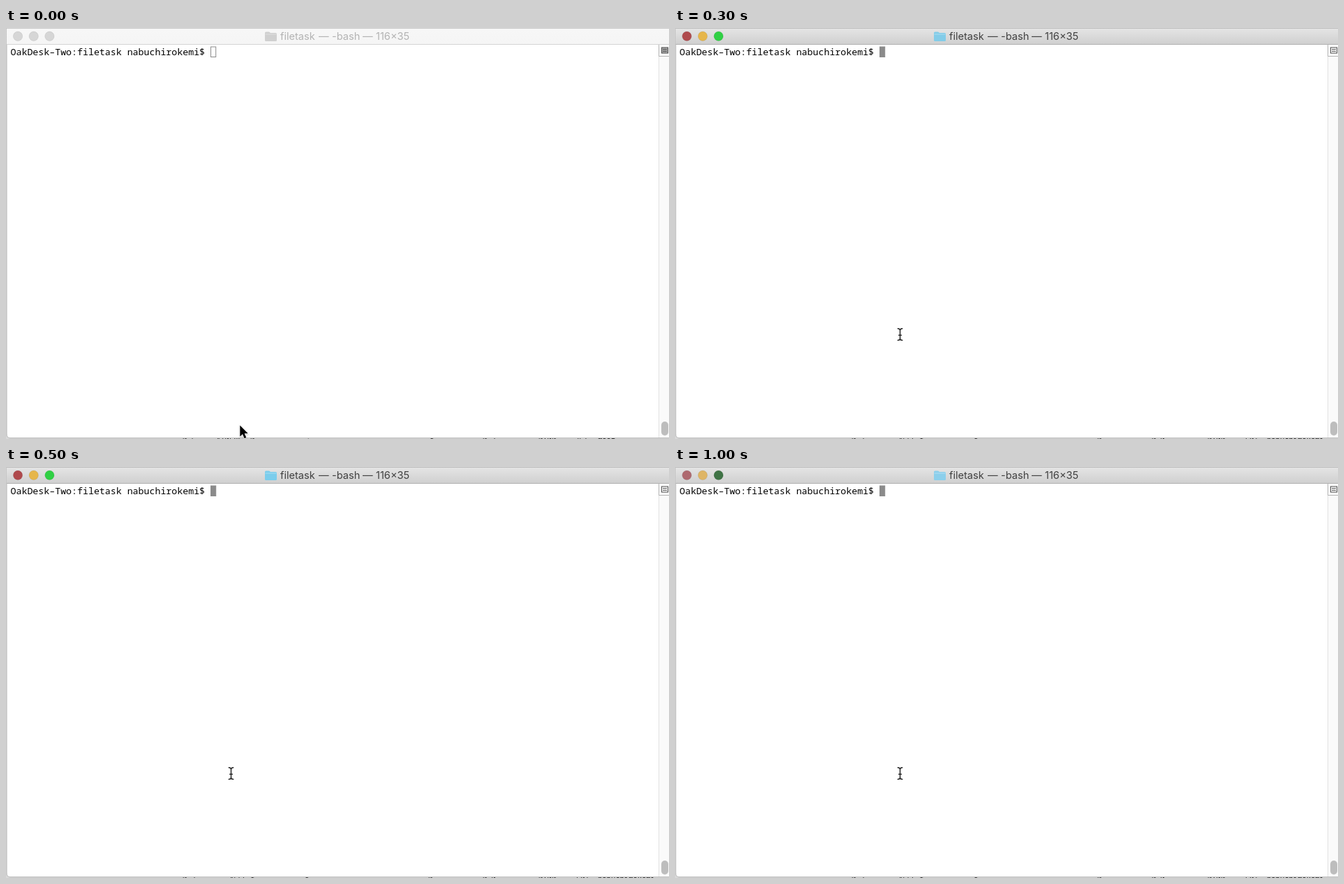
An HTML page for the animation above (1.2 s loop, 950x589 px).

```html
<!DOCTYPE html>
<html lang="en">
<head>
<meta charset="utf-8">
<title>Terminal</title>
<style>
  html, body { margin: 0; width: 100%; height: 100%; overflow: hidden; background: #fff; }
  svg { display: block; width: 950px; height: 589px; }
  text { white-space: pre; }
  .mono { font-family: "Noto Sans Mono", "DejaVu Sans Mono", monospace; }
  .title { font: 14.6px Inter, "Liberation Sans", sans-serif; fill: var(--label); }
  .prompt { font-size: 13.27px; font-weight: 500; fill: #000; }
  .behind { font-size: 10.5px; fill: #222; }
  #bar { fill: url(#idle); }
  .active #bar { fill: url(#focus); }
  #stage { --label: #b3b3b3; --rule: #d4d4d4; --top: #c9c9c9; }
  #stage.active { --label: #414141; --rule: #b1b1b1; --top: #bdbdbd; }
</style>
</head>
<body>
<svg id="stage" viewBox="0 0 950 589">
  <defs>
    <linearGradient id="idle" x2="0" y2="1">
      <stop stop-color="#f7f7f7"/><stop offset="1" stop-color="#f5f5f5"/>
    </linearGradient>
    <linearGradient id="focus" x2="0" y2="1">
      <stop stop-color="#e5e5e5"/><stop offset="1" stop-color="#cfcfcf"/>
    </linearGradient>
    <filter id="soft" x="-50%" y="-50%" width="200%" height="200%">
      <feDropShadow dx="0" dy="1" stdDeviation="1.1" flood-opacity=".35"/>
    </filter>
  </defs>

  <!-- Windows behind -->
  <rect width="950" height="589" fill="#d8d8d8"/>
  <g id="behind" class="mono behind"></g>

  <!-- Window -->
  <path d="M1 0H950V587.5H6Q1 587.5 1 582Z" fill="#fff" stroke="#b4b4b4"/>
  <rect id="bar" x="1" width="949" height="24"/>
  <path d="M1 .5H950" stroke="var(--top)"/>
  <path d="M1 23.5H950" stroke="var(--rule)"/>
  <g id="lights"></g>
  <g id="folder">
    <path d="M371 7Q371 5.5 372.5 5.5H377L379 7H386.5Q388 7 388 8.5V17.5Q388 19 386.5 19H372.5Q371 19 371 17.5Z"/>
    <path d="M371.5 9H387.5" stroke="#fff" stroke-opacity=".35"/>
  </g>
  <g id="title" class="title"></g>

  <!-- Scroll bar -->
  <path d="M936 24H950V587H936Z" fill="#fafafa"/>
  <path d="M935.5 24V587" stroke="#e3e3e3"/>
  <path d="M950 40.5H935.5V24" fill="none" stroke="#b4b4b4"/>
  <rect id="split" x="939.5" y="28" width="9" height="8" stroke="#4a4a4a"/>
  <path d="M941 30.7H947M941 33.3H947" stroke="#4a4a4a"/>
  <rect x="939" y="564" width="10" height="20" rx="5" fill="#bdbdbd"/>

  <text id="prompt" class="mono prompt" x="6.5" y="39"></text>
  <rect id="caret" x="293.5" y="27" width="7.2" height="14.5" stroke="#8b8b8b"/>

  <!-- Pointers -->
  <path id="arrow" d="M0 0V16L3.7 12.6L6.2 18.6L9 17.4L6.4 11.5H11.4Z"
        stroke="#fff" stroke-width="1.2" paint-order="stroke" filter="url(#soft)"/>
  <g id="beam" fill="none" stroke-linecap="round">
    <path d="M319.3 430.8Q322.5 431 322.5 433.5V445Q322.5 447.4 319.3 447.6M325.7 430.8Q322.5 431 322.5 433.5M322.5 445Q322.5 447.4 325.7 447.6M320.7 440.3H324.3"
          stroke="#262626" stroke-width="1.5"/>
  </g>
</svg>
<script>
const LOOP = 1200;
const FOLDER = "filetask", USER = "nabuchirokemi";
const $ = id => document.getElementById(id);

function add(parent, tag, attrs, text = "") {
  const el = document.createElementNS("http://www.w3.org/2000/svg", tag);
  for (const key in attrs) el.setAttribute(key, attrs[key]);
  el.textContent = text;
  return parent.appendChild(el);
}

const idle = ["#d6d6d6", "#d6d6d6", "#d6d6d6"];
const lit = ["#af4a4d", "#e6b64b", "#30d044"];
const dim = ["#ae696f", "#deb565", "#3f7345"];

const steps = [
  { at: 0, arrow: [335.3, 569.5], lights: idle, folder: "#d0d0d0", rows: 0 },
  { at: 100, arrow: [322.3, 437.5], lights: idle, folder: "#d0d0d0", rows: 1 },
  { at: 200, active: true, lights: lit, folder: "#83cce8", rows: 1 },
  { at: 300, active: true, block: true, lights: lit, folder: "#83cce8", rows: 1 },
  { at: 500, active: true, block: true, lights: lit, folder: "#7bcdec", rows: 1 },
  { at: 700, active: true, block: true, lights: dim, folder: "#8ccfeb", rows: 1 }
];

// Listing rows of which only a sliver shows below the window
const rows = [
  [[253, "0.5"], [301, "410586"], [350, "0"], [430, "'"], [607, "*"],
   [683, "0.7"], [763, "0:00"], [815, "251"], [848, "root"]],
  [[253, "0.7"], [320, "4556"], [350, "*"], [428, "*"], [605, "0"],
   [683, "0.0"], [763, "0:00"], [817, "501"], [848, USER]]
].map(row => {
  const g = add($("behind"), "g", {});
  for (const [x, text] of row) add(g, "text", { x, y: 594 }, text);
  return g;
});

const lights = [17, 39.7, 62.4].map(cx => add($("lights"), "circle",
  { cx, cy: 11.8, r: 6.7, stroke: "#000", "stroke-opacity": .07 }));

const title = [[393, FOLDER], [448, "—"], [467, "-bash"], [511, "—"], [530, "116×35"]];
for (const [x, text] of title) add($("title"), "text", { x, y: 17 }, text);

$("prompt").textContent = `OakDesk–Two:${FOLDER} ${USER}$ `;

const show = (el, on) => el.setAttribute("visibility", on ? "visible" : "hidden");

function draw(time) {
  const s = steps.findLast(step => step.at <= time);
  $("stage").classList.toggle("active", !!s.active);
  lights.forEach((el, i) => el.setAttribute("fill", s.lights[i]));
  $("folder").setAttribute("fill", s.folder);
  $("caret").setAttribute("fill", s.block ? "#8b8b8b" : "#fff");
  $("split").setAttribute("fill", s.active ? "#fff" : "#aaa");
  rows.forEach((el, i) => show(el, i === s.rows));
  show($("arrow"), s.arrow);
  show($("beam"), !s.arrow);
  if (s.arrow) $("arrow").setAttribute("transform", `translate(${s.arrow})`);
}

const start = performance.now();
function tick() {
  draw((performance.now() - start) % LOOP);
  requestAnimationFrame(tick);
}
tick();
</script>
</body>
</html>
```
